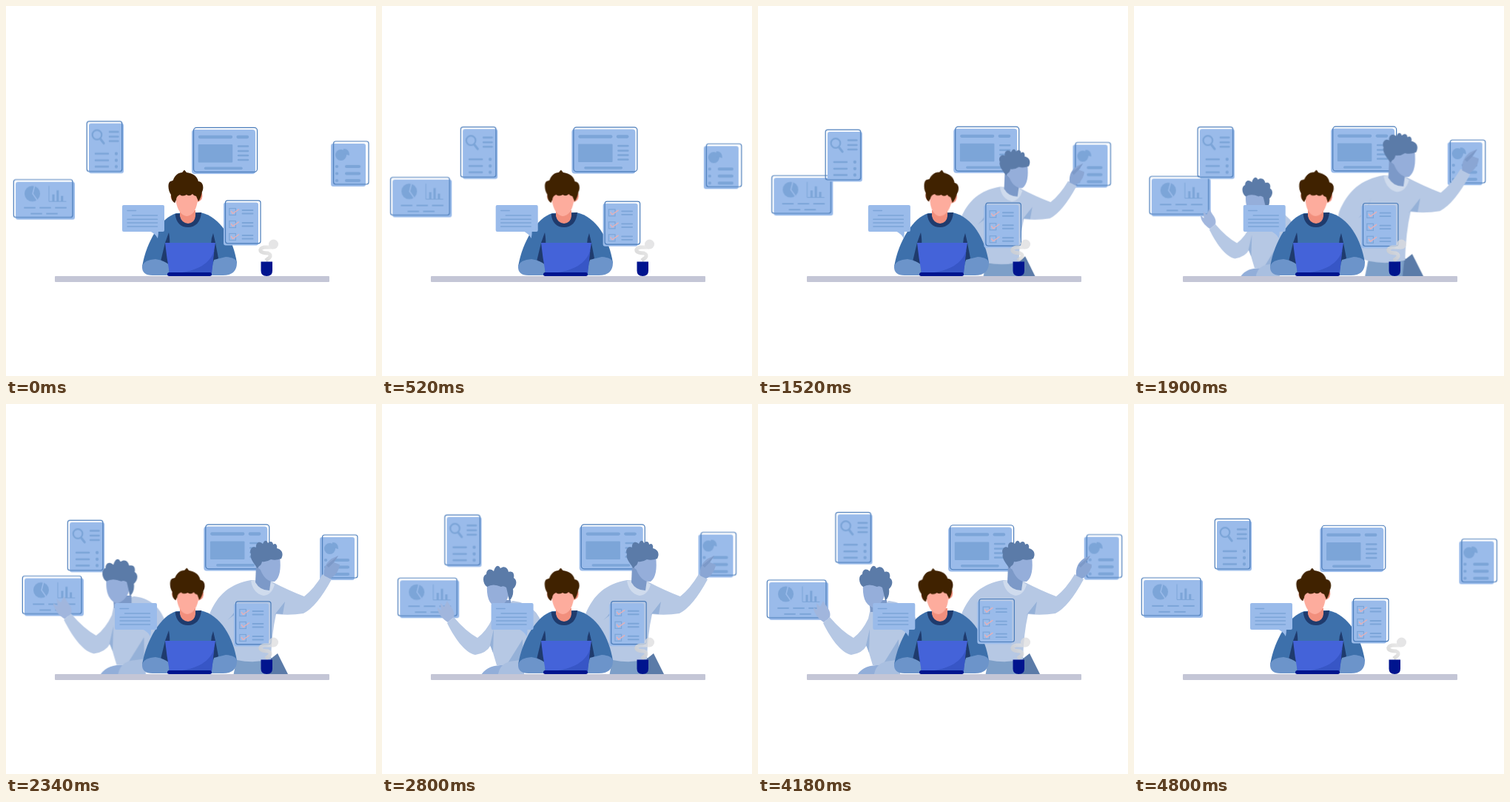
These frames come from a looping animation (500x500 px, 4.84 s). An HTML page without scripts:

```html
<!DOCTYPE html>
<html lang="en">
<head>
<meta charset="utf-8">
<title>Multitasking at the desk</title>
<style>
  html, body { margin: 0; width: 100%; height: 100%; overflow: hidden; background: #fff; }
  svg { display: block; width: 100%; height: 100%; }

  .card { fill: #9abbea; }
  .frame { fill: none; stroke: #4a7cba; stroke-width: 1.2; }
  .ink { fill: #7ca5d8; }
  .line { fill: none; stroke: #7ca5d8; stroke-width: 2.2; stroke-linecap: round; }
  .gap { fill: none; stroke: #9abbea; stroke-width: 1.6; }
  .tick { fill: none; stroke: #e3b1b9; stroke-width: 1.5; }

  .ghost .hair { fill: #5b7ba8; }
  .ghost .skin { fill: #95aeda; }
  .ghost .shade { fill: #7c99c8; }
  .ghost .shirt { fill: #b6c8e4; }
  .ghost .fold { fill: #95b1d8; }
  .ghost .collar { fill: #cfdbed; }
  .ghost .leg { fill: #7d9fc8; }

  /* Horizontal motion uses translate, vertical motion uses transform. */
  .float {
    animation: sway 2.42s cubic-bezier(.37, 0, .63, 1) infinite alternate,
               bob 2.42s cubic-bezier(.37, 0, .63, 1) var(--lag) infinite alternate;
  }
  .profile { animation-name: reach, bob; animation-duration: 4.84s, 2.42s;
             animation-delay: -.54s, var(--lag); animation-direction: normal, alternate; }
  .drift { --back: cubic-bezier(.37, 0, .63, 1); animation: drift 4.84s var(--back) infinite; }
  .browser { --back: cubic-bezier(.42, 0, .8, .8); }
  .head { transform-origin: 245px 288px; animation: nod 4.84s linear infinite; }

  /* Helpers pop out from behind the worker and shrink back. */
  .ghost { transform-origin: 245px 365px; animation: 4.84s infinite; }
  .right { animation-name: pop-right; }
  .left { animation-name: pop-left; }

  @keyframes sway { from { translate: 0 0; } to { translate: var(--x) 0; } }
  @keyframes bob {
    from { transform: translateY(var(--from)); }
    to { transform: translateY(var(--to)); }
  }
  @keyframes reach {
    0%, 100% { translate: 1.8px 0; }
    54.5% { translate: -15.5px 0; }
  }
  @keyframes drift {
    0% { translate: 0 0; animation-timing-function: ease-out; }
    50% { translate: var(--x) var(--y); }
    100% { translate: 0 0; }
  }
  @keyframes nod {
    0%, 100% { transform: rotate(0); }
    10% { transform: rotate(.5deg); }
    31% { transform: rotate(6.5deg); }
    48% { transform: rotate(3deg); }
    68% { transform: rotate(-2.2deg); }
    86% { transform: rotate(-4deg); }
  }
  @keyframes pop-right {
    0%, 98.5%, 100% { transform: scale(0); }
    24.6% { transform: scale(0); animation-timing-function: cubic-bezier(.34, 1.56, .64, 1); }
    45.3% { transform: scale(1); }
    88.5% { transform: scale(1); animation-timing-function: ease-in; }
  }
  @keyframes pop-left {
    0%, 98.5%, 100% { transform: scale(0); }
    33% { transform: scale(0); animation-timing-function: cubic-bezier(.34, 1.56, .64, 1); }
    53.7% { transform: scale(1); }
    88.5% { transform: scale(1); animation-timing-function: ease-in; }
  }
</style>
</head>
<body>
<svg viewBox="0 0 500 500">
  <defs>
    <clipPath id="above-desk"><rect width="500" height="365"/></clipPath>
    <linearGradient id="steam" x1="0" y1="1" x2="1" y2="0">
      <stop offset="0" stop-color="#c9c9c9"/>
      <stop offset="1" stop-color="#e4e4e4"/>
    </linearGradient>
    <g id="check-row">
      <rect class="line" x="301.8" y="273.5" width="8.6" height="9" style="stroke-width:1.2"/>
      <path class="tick" d="M304 277l2.5 3.5 8.5-6"/>
      <path class="line" d="M319.5 276h14M319.5 280.5h14" style="stroke-width:1.8"/>
    </g>
  </defs>

  <!-- Charts -->
  <g class="float" style="--x:12px;--from:3.5px;--to:-5.9px;--lag:-1.075s">
    <rect class="card" x="13" y="238" width="80" height="51" rx="3"/>
    <circle class="ink" cx="35.5" cy="254" r="10.5"/>
    <path class="gap" d="M39 242l-3 12 7 10"/>
    <path class="line" d="M58 244v20.5h23" style="stroke-width:1"/>
    <path class="ink" d="M62.5 255h3v9h-3zM68.3 249.5h3v14.5h-3zM74.2 257h3v7h-3z"/>
    <path class="line" d="M25 273h14M46 273h14M67 273h14M34 281h14M55 281h14" style="stroke-width:1.8"/>
    <rect class="frame" x="10.3" y="235" width="79.7" height="51" rx="3"/>
  </g>

  <!-- Search -->
  <g class="float" style="--x:-26px;--from:-11.8px;--to:12.8px;--lag:-1.21s">
    <rect class="card" x="112" y="158" width="47" height="67.5" rx="3"/>
    <circle class="line" cx="123" cy="173.5" r="6.3"/>
    <path class="line" d="M127.5 179l4.7 6" style="stroke-width:3"/>
    <path class="line" d="M140 169.5h11.5M140 176h11.5M140 182h11.5M121 199h17M121 208h17M121 216.5h17" style="stroke-width:2.5"/>
    <path class="line" d="M149 199h0M149 208h0M149 216.5h0" style="stroke-width:4.3"/>
    <rect class="frame" x="109.3" y="155.3" width="47.5" height="67.7" rx="3"/>
  </g>

  <!-- Browser -->
  <g class="drift browser" style="--x:16.3px;--y:-1.5px">
    <rect class="card" x="251" y="167" width="86" height="60" rx="4"/>
    <path class="line" d="M262 177h42M313.5 177h12.5" style="stroke-width:4.3"/>
    <rect class="ink" x="259.7" y="187" width="46.5" height="24.5" rx="1"/>
    <path class="line" d="M314 189.5h13M314 196h13M314 202h13M314 208h13" style="stroke-width:2.5"/>
    <path class="line" d="M269.5 219.3h48.5" style="stroke-width:3.4"/>
    <rect class="frame" x="253.5" y="164.3" width="86" height="60" rx="4"/>
  </g>

  <!-- Profile -->
  <g class="float profile" style="--from:-10px;--to:5px;--lag:-1.56s">
    <rect class="card" x="439" y="185" width="47" height="58" rx="3"/>
    <circle class="ink" cx="452.5" cy="200.5" r="7.5"/>
    <path class="ink" d="M456 199v-7q8 0 8 9z"/>
    <path class="line" d="M447 216h0M447 225.5h0M447 235h0M460 216h17M460 225.5h17M460 235h17" style="stroke-width:4.2"/>
    <rect class="frame" x="442.5" y="182" width="47.5" height="58" rx="3"/>
  </g>

  <g clip-path="url(#above-desk)">
    <g class="ghost right">
      <path class="leg" d="M312 343h47l5 30H306z"/>
      <path class="hair" d="M357 345l10-8 18 36h-31z"/>
      <path class="shirt" d="M331 238C303 243 286 257 275 284L264 330L312 346Q335 351 358 345Q359 310 365 284Q385 286 402 283Q420 274 440 237L428 230Q416 250 403 260Q382 252 359 240z"/>
      <path class="fold" d="M315 267Q311 282 299 292L310 284zM377 267L362 286L365 283L374 284z"/>
      <path class="collar" d="M331 239Q334 256 348 259Q359 258 363 244L356 239z"/>
      <path class="shade" d="M338 218L337 241Q343 252 356 252L358 238z"/>
      <path class="skin" d="M339 214L370 206C372 223 370 235 363 240C354 241 347 233 344 224Q338 221 339 214z"/>
      <path class="hair" d="M340 222C334 215 329 207 331 203C328 197 333 191 338 194C337 188 342 184 347 189C349 184 352 183 354 188C358 184 361 187 361 190C365 187 367 192 366 195C374 197 375 203 372 209Q364 212 358 210Q352 214 346 213Q345 218 342 219z"/>
      <path d="M430 232C429 221 433 214 440 209L449 205L443 214L451 217C450 226 444 233 438 236z" fill="#8aa6d4"/>
      <path class="shade" d="M433 218L449 205L443 214L436 221z"/>
    </g>

    <g class="ghost left">
      <path class="leg" d="M133 368Q140 354 160 353H192V368z" style="fill:#92aed9"/>
      <path class="shirt" d="M152 276L149 290Q141 307 129 316Q113 307 97 288L88 296C97 314 111 336 126 339Q141 337 147 326L155 353H195L222 320Q216 270 177 266z"/>
      <path class="fold" d="M151 304L146 326L150 336zM190 318L170 350H190z"/>
      <path d="M157 365Q160 348 180 347L192 345V368z" fill="#a9bfe0"/>
      <path class="shade" d="M150 265H174V281H152z"/>
      <path class="skin" d="M142 244H173C173 262 166 273 155 275C144 271 141 259 142 244z"/>
      <path class="hair" d="M142 247C136 243 135 232 141 230C141 224 146 221 151 226C153 219 157 216 160 222C166 218 170 222 171 227C178 225 179 231 178 235C184 239 181 247 177 250C178 257 176 262 172 266Q170 256 168 248Q164 245 161 247Q150 242 142 247z"/>
      <path class="skin" d="M89 295C81 290 75 282 75 275L80 279L79 269L84 274L88 266L93 274C98 280 98 285 97 288z" style="fill:#a1b6dd"/>
    </g>
  </g>

  <!-- Worker -->
  <path d="M230 280C210 286 190 317 184 352L220 364H278L312 347C307 315 290 285 263 279z" fill="#3d70ab"/>
  <path d="M220 306Q222 316 221 330L220 350L209 345L215 320zM280 307Q277 314 277 322L276 348L287 341L283 320z" fill="#1f3b6d"/>
  <path d="M184 351Q187 343 202 342Q214 344 221 350L220 364H198Q183 364 184 351z" fill="#6c94ca"/>
  <path d="M312 347Q311 340 297 339L281 343L276 364H293Q312 364 312 347z" fill="#6c94ca"/>
  <path d="M228.5 281C230 293 236 299 246 299C256 299 263 292 264 279z" fill="#1f3b6d"/>
  <path d="M235 276V284Q237 293 246 294Q255 293 256 284V276z" fill="#f28f7d"/>
  <g class="head">
    <path d="M223 253Q221 263 229 266V252zM265 253Q267 262 259 265V252z" fill="#f28f7d"/>
    <path d="M229 248H260C260 270 255 283 244 284C233 282 228 268 229 248z" fill="#fdac9d"/>
    <path d="M228 266C224 264 223 258 223 255C219 250 218 239 222 237Q226 236 226 235C228 229 233 225 238 225L241 221.5L244 225C252 226 258 229 260 237C266 237 268 245 265 251C264 257 262 262 260 264L257 257Q254 257 252 254Q248 258 244 255Q238 258 235 255Q230 257 230 262z" fill="#402200"/>
  </g>
  <path d="M215 320H283Q279 342 278 361H221Q217 340 215 320z" fill="#4463d9"/>
  <path d="M281.5 330C276 348 259 358 231 361H278z" fill="#3756c6"/>
  <rect x="218" y="360" width="60" height="5" rx="2.5" fill="#00148e"/>
  <rect x="66" y="365" width="371" height="8" rx="1" fill="#c4c6d6"/>

  <!-- Chat -->
  <g class="drift" style="--x:-10px;--y:0px">
    <path class="card" d="M194 304Q202 308 205 314Q206 309 206 304z"/>
    <rect class="card" x="157" y="269" width="57" height="36" rx="2"/>
    <path class="line" d="M164 276.5h11.5M170.5 283h34M164 288.3h40.5M164 293h40.5M164 298h40.5" style="stroke-width:1.5"/>
  </g>

  <!-- Checklist -->
  <g class="drift" style="--x:14px;--y:4px">
    <rect class="card" x="294" y="265.5" width="47" height="58" rx="3"/>
    <use href="#check-row"/>
    <use href="#check-row" y="17"/>
    <use href="#check-row" y="34"/>
    <rect class="frame" x="296.5" y="262.8" width="47.5" height="58" rx="3"/>
  </g>

  <!-- Coffee -->
  <g opacity=".75">
    <path d="M361 326H349Q343 327 344 331Q346 334 354 334Q359 336 356 340L351 344" fill="none" stroke="url(#steam)" stroke-width="5"/>
    <circle cx="361.5" cy="322" r="6.5" fill="#dcdcde"/>
  </g>
  <path d="M344.5 345.5H360V358Q360 365 352.3 365Q344.5 365 344.5 358z" fill="#00148e"/>
</svg>
</body>
</html>
```
